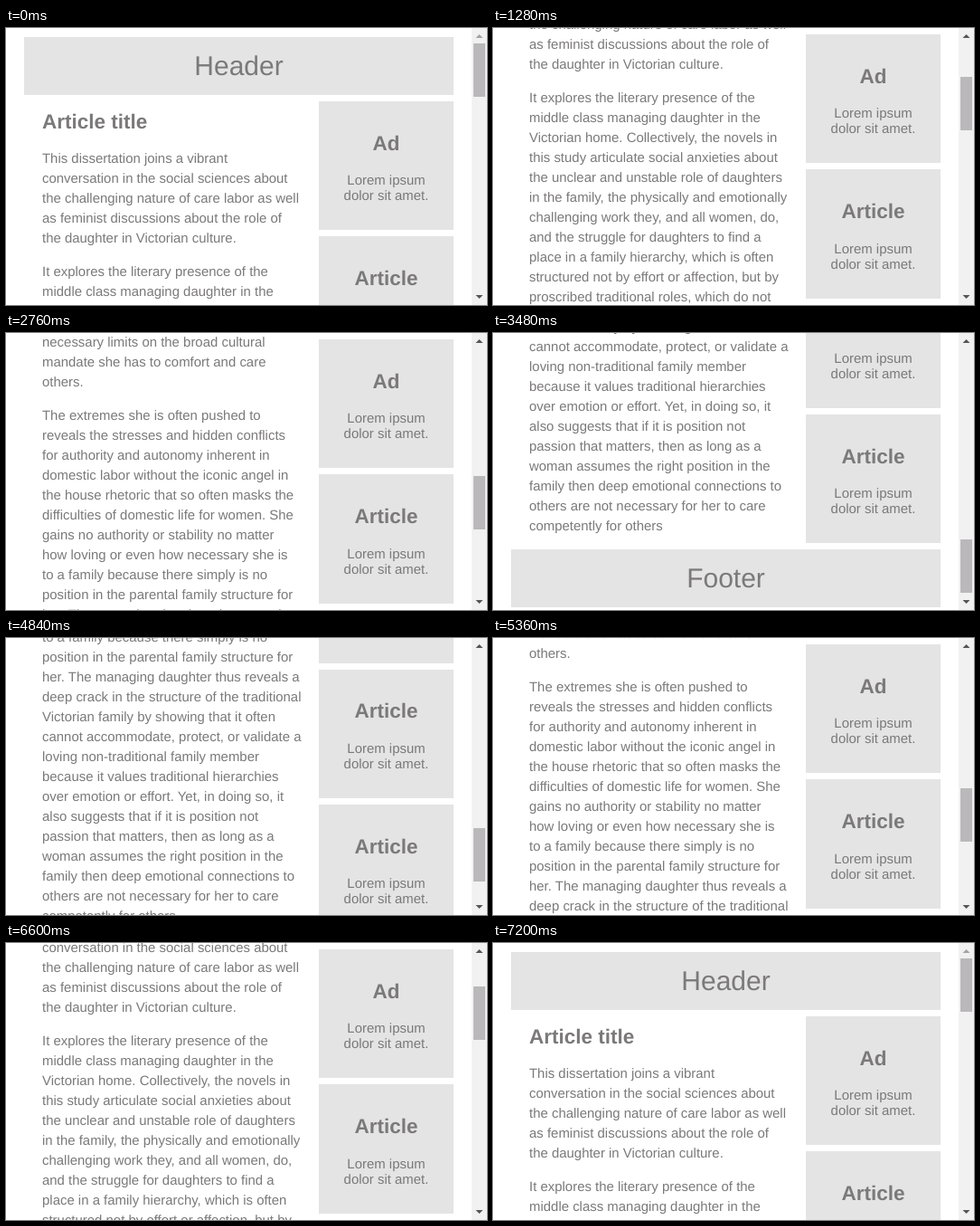
An HTML page with a canvas that plays this animation: 532x306 px, repeating every 7.24 s.

```html
<!DOCTYPE html>
<html lang="en">
<head>
<meta charset="utf-8">
<title>Sticky sidebar</title>
<style>
html, body { margin: 0; width: 100%; height: 100%; overflow: hidden; background: #fff; }
canvas { display: block; }
</style>
</head>
<body>
<canvas id="stage" width="532" height="306"></canvas>
<script>
const ctx = document.getElementById('stage').getContext('2d');
const W = 532, H = 306, LOOP = 7240;
const INK = '#7b797a', PANEL = '#e4e4e4';
const FAMILY = '"Liberation Sans", Arial, sans-serif';

const paragraphs = `This dissertation joins a vibrant
conversation in the social sciences about
the challenging nature of care labor as well
as feminist discussions about the role of
the daughter in Victorian culture.

It explores the literary presence of the
middle class managing daughter in the
Victorian home. Collectively, the novels in
this study articulate social anxieties about
the unclear and unstable role of daughters
in the family, the physically and emotionally
challenging work they, and all women, do,
and the struggle for daughters to find a
place in a family hierarchy, which is often
structured not by effort or affection, but by
proscribed traditional roles, which do not
easily adapt to managing daughters, even
if they are the ones holding the family
together.

The managing daughter is a problem not
accounted for in any conventional domestic
structure or ideology so there is no role, no
clear set of responsibilities and no
boundaries that could, and arguably
should, define her obligations, offer her
opportunities for empowerment, or set
necessary limits on the broad cultural
mandate she has to comfort and care
others.

The extremes she is often pushed to
reveals the stresses and hidden conflicts
for authority and autonomy inherent in
domestic labor without the iconic angel in
the house rhetoric that so often masks the
difficulties of domestic life for women. She
gains no authority or stability no matter
how loving or even how necessary she is
to a family because there simply is no
position in the parental family structure for
her. The managing daughter thus reveals a
deep crack in the structure of the traditional
Victorian family by showing that it often
cannot accommodate, protect, or validate a
loving non-traditional family member
because it values traditional hierarchies
over emotion or effort. Yet, in doing so, it
also suggests that if it is position not
passion that matters, then as long as a
woman assumes the right position in the
family then deep emotional connections to
others are not necessary for her to care
competently for others`.split('\n\n').map(p => p.split('\n'));

// Page layout
const BODY = 14.95, LINE = 22, GAP = 15;
const SIDE_TOP = 81, STICK = 7, SIDE_END = 1330.4;
const BOX = 142.35, PITCH = 149.35;
const PAGE = 1411, MAX = PAGE - H;

// Scroll positions as [time, offset]
const keys = [
  [800, 0], [1280, 192], [2760, 736], [3480, 1098], [3640, MAX],
  [4440, MAX], [4840, 1004], [6080, 410], [7180, 0]
];

function slope(i) {
  return (keys[i + 1][1] - keys[i][1]) / (keys[i + 1][0] - keys[i][0]);
}

function tangent(i) {
  if (i === 0 || i === keys.length - 1) return 0;
  const a = slope(i - 1), b = slope(i);
  return a * b <= 0 ? 0 : 2 * a * b / (a + b);
}

// Monotone cubic through the keys
function scrollAt(t) {
  const last = keys.length - 1;
  if (t <= keys[0][0] || t >= keys[last][0]) return 0;
  let i = 0;
  while (t > keys[i + 1][0]) i++;
  const [t0, y0] = keys[i], [t1, y1] = keys[i + 1];
  const d = t1 - t0, u = (t - t0) / d, v = 1 - u;
  return Math.round(
    y0 * (1 + 2 * u) * v * v + y1 * u * u * (3 - 2 * u) +
    d * u * v * (tangent(i) * v - tangent(i + 1) * u));
}

function text(str, x, y, size, align = 'left', weight = 'normal') {
  if (y < -10 || y > H + 30) return;
  ctx.font = `${weight} ${size}px ${FAMILY}`;
  ctx.textRendering = 'geometricPrecision';
  ctx.textAlign = align;
  ctx.fillStyle = INK;
  ctx.fillText(str, x, Math.round(y));
}

function rect(x, top, w, bottom, color) {
  const y = Math.round(top);
  ctx.fillStyle = color;
  ctx.fillRect(x, y, w, Math.round(bottom) - y);
}

function banner(label, y) {
  rect(20, y, 475, y + 64, PANEL);
  text(label, 257.5, y + 42, 30, 'center');
}

function article(scroll) {
  text('Article title', 40, 111 - scroll, 22.5, 'left', 'bold');
  let y = 149 - scroll;
  for (const lines of paragraphs) {
    for (const line of lines) {
      text(line, 40, y, BODY);
      y += LINE;
    }
    y += GAP;
  }
}

function sidebar(scroll) {
  const stuck = Math.max(SIDE_TOP, scroll + STICK);
  const top = Math.min(stuck, SIDE_END - 2 * PITCH - BOX) - scroll;
  ['Ad', 'Article', 'Article'].forEach((label, i) => {
    const y = top + i * PITCH;
    rect(346, y, 149, y + BOX, PANEL);
    text(label, 420.5, y + 53.65, 22.5, 'center', 'bold');
    text('Lorem ipsum', 420.5, y + 92.35, BODY, 'center');
    text('dolor sit amet.', 420.5, y + 109.35, BODY, 'center');
  });
}

function arrow(y, dir, on) {
  ctx.fillStyle = on ? '#555' : '#a3a3a3';
  ctx.beginPath();
  ctx.moveTo(523.5, y - 2 * dir);
  ctx.lineTo(527.5, y + 2 * dir);
  ctx.lineTo(519.5, y + 2 * dir);
  ctx.fill();
}

function scrollbar(scroll) {
  rect(515, 0, 17, H, '#f1f1f1');
  const y = 17 + Math.floor(scroll * 272 / PAGE);
  rect(517, y, 13, y + 59, '#bab8ba');
  arrow(9, 1, scroll > 0);
  arrow(297, -1, scroll < MAX);
}

function draw(t) {
  const scroll = scrollAt(t);
  rect(0, 0, W, H, '#fff');
  banner('Header', 10 - scroll);
  article(scroll);
  sidebar(scroll);
  banner('Footer', 1337 - scroll);
  scrollbar(scroll);
}

const start = performance.now();
function tick() {
  draw((performance.now() - start) % LOOP);
  requestAnimationFrame(tick);
}
tick();
</script>
</body>
</html>
```
